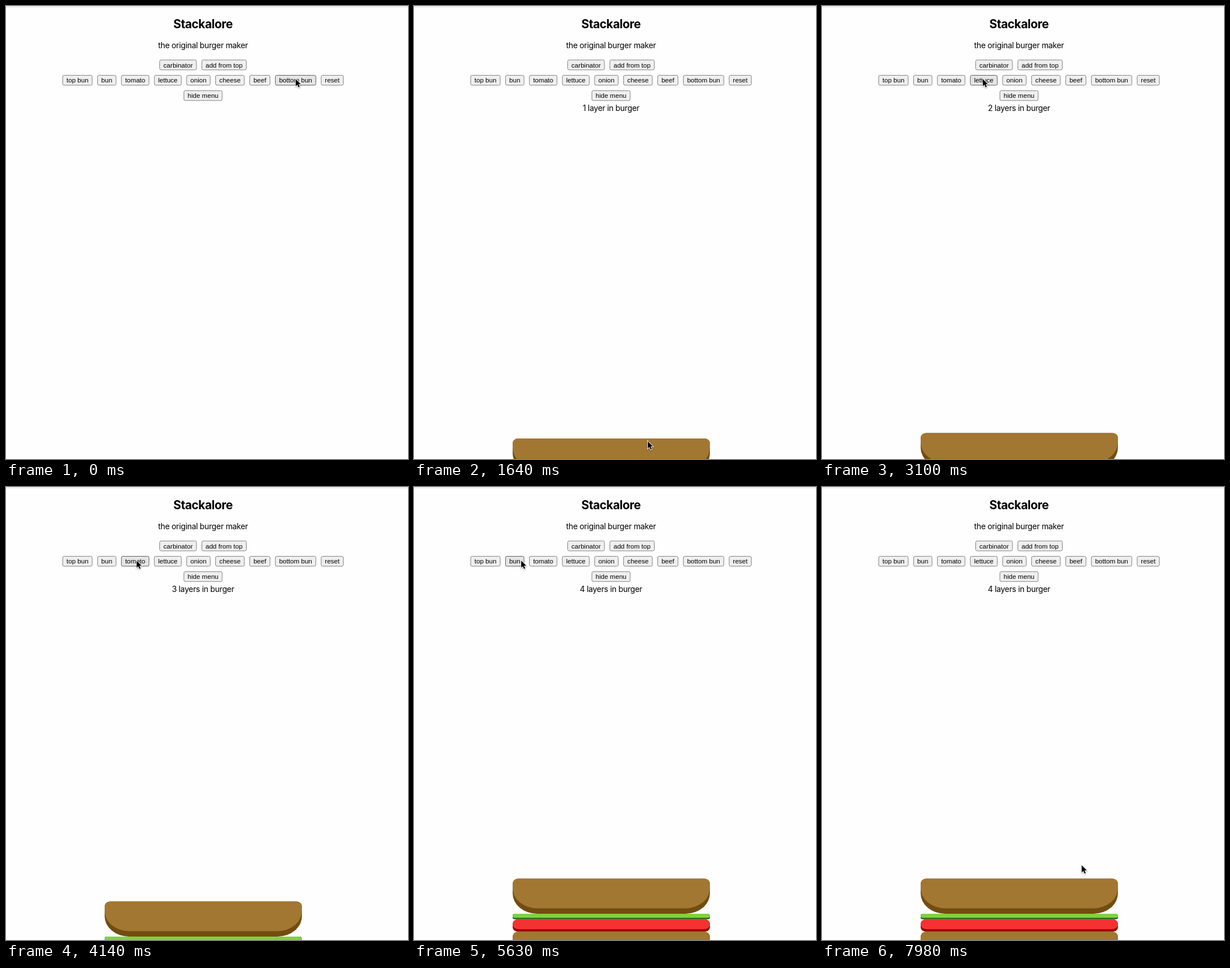
An HTML page for the animation above (8 s loop, 705 by 794 pixels).

```html
<!DOCTYPE html>
<html lang="en">
<head>
<meta charset="utf-8">
<title>Stackalore</title>
<style>
html, body { margin: 0; width: 100%; height: 100%; overflow: hidden; background: #fefefe; }
svg { display: block; }
text { text-anchor: middle; fill: #000; font: 13.9px Inter, sans-serif; letter-spacing: -.3px; }
.title { font-size: 20.8px; font-weight: 700; letter-spacing: -.45px; }
.btn text { font: 11.57px "Liberation Sans", Arial, sans-serif; letter-spacing: 0; }
.btn rect { fill: #efefef; stroke: #767676; stroke-width: .9; }
.btn.hover rect { fill: #e5e5e5; stroke: #4f4f4f; }
.btn.active rect { fill: #f5f5f5; stroke: #8d8d8d; }
#cursor { filter: drop-shadow(0 1px 1px rgba(0, 0, 0, .35)); }
</style>
</head>
<body>
<svg width="705" height="794" viewBox="0 0 705 794">
  <rect width="705" height="794" fill="#fefefe"/>
  <rect y="1" width="705" height="1" fill="#d2d2d2"/>
  <text class="title" x="345.5" y="39">Stackalore</text>
  <text x="345.5" y="73.5">the original burger maker</text>
  <g id="buttons"></g>
  <text id="count" x="345.5" y="183.5"></text>
  <g id="burger"></g>
  <path id="cursor" d="M0 0V12.6L2.9 9.9L4.9 14.6L7 13.7L5 9.1H9Z"
        fill="#000" stroke="#fff" stroke-width="1.8" paint-order="stroke"/>
</svg>
<script>
const LOOP = 8000;
const TICK = 147.7; // the screen refreshes once per tick
const CENTER = 345.5;
const $ = id => document.getElementById(id);

function add(parent, tag, attrs = {}, text = '') {
  const el = document.createElementNS('http://www.w3.org/2000/svg', tag);
  for (const k in attrs) el.setAttribute(k, attrs[k]);
  el.textContent = text;
  return parent.appendChild(el);
}

// Buttons are as wide as their label and each row is centred
const menu = [
  'carbinator,add from top',
  'top bun,bun,tomato,lettuce,onion,cheese,beef,bottom bun,reset',
  'hide menu'
];
const PAD = 7, GAP = 8.5, HEIGHT = 18.2;

function buildRow(labels, row) {
  const y = 94.2 + row * 26.85;
  const items = labels.split(',').map(label => {
    const el = add($('buttons'), 'g', { class: 'btn' });
    const box = add(el, 'rect', { y: y + .45, height: HEIGHT - .9, rx: 2.5 });
    const text = add(el, 'text', { y: y + 13.3 }, label);
    return { el, box, text, y, w: text.getComputedTextLength() + 2 * PAD };
  });
  let x = CENTER - (items.reduce((sum, b) => sum + b.w + GAP, -GAP)) / 2;
  for (const b of items) {
    b.x = x;
    b.box.setAttribute('x', x + .45);
    b.box.setAttribute('width', b.w - .9);
    b.text.setAttribute('x', x + b.w / 2);
    x += b.w + GAP;
  }
  return items;
}
const buttons = menu.flatMap(buildRow);

// Slab with round top corners and elliptical bottom corners
function slab(h, top, rx, ry) {
  const l = 173, r = 519;
  return `M${l} ${top}A${top} ${top} 0 0 1 ${l + top} 0H${r - top}A${top} ${top} 0 0 1 ${r} ${top}` +
    `V${h - ry}A${rx} ${ry} 0 0 1 ${r - rx} ${h}H${l + rx}A${rx} ${ry} 0 0 1 ${l} ${h - ry}Z`;
}

const layers = [
  { h: 61.5, lip: 9.5, top: 9, rx: 43, ry: 36, face: '#a27731', edge: '#724c10' },
  { h: 9.6, lip: 2.6, top: 4, rx: 4, ry: 3, face: '#80d13e', edge: '#27701a' },
  { h: 21.8, lip: 4.6, top: 9, rx: 10, ry: 8, face: '#f43232', edge: '#980c0c' },
  { h: 40, lip: 7, top: 9, rx: 9, ry: 9, face: '#a27731', edge: '#724c10' }
];
for (const s of layers) {
  s.el = add($('burger'), 'g');
  add(s.el, 'path', { d: slab(s.h, s.top, s.rx, s.ry), fill: s.edge });
  add(s.el, 'path', { d: slab(s.h - s.lip, s.top, s.rx, s.ry), fill: s.face });
}

// Cursor stops: tick, x, y
const stops = [
  [8, 508, 128], [11, 410, 763], [13, 61, 470], [19, 282, 128],
  [23, 282, 128], [26, 229, 129], [34, 229, 129], [36, 188, 129],
  [39, 188, 129], [43, 405, 761], [45, 438, 771], [47, 407, 757],
  [50, 572, 330], [52, 450, 663], [53, 450, 663], [54, 455.5, 663]
];
// Ticks of mouse presses; the release, one tick later, adds a layer
const presses = [4, 20, 27, 37];

function cursorAt(tick) {
  const i = stops.findIndex(s => s[0] >= tick);
  if (i < 1) return stops.at(i).slice(1);
  const [a, b] = [stops[i - 1], stops[i]];
  const p = (tick - a[0]) / (b[0] - a[0]);
  const e = p * p * (3 - 2 * p);
  return [a[1] + (b[1] - a[1]) * e, a[2] + (b[2] - a[2]) * e];
}

function render(t) {
  const tick = Math.max(0, Math.floor((t - 9) / TICK + .08));
  const [x, y] = cursorAt(tick);
  const pressed = presses.includes(tick);
  const n = presses.filter(p => tick > p).length;

  $('cursor').setAttribute('transform', `translate(${x} ${y})`);
  for (const b of buttons) {
    const over = x >= b.x && x <= b.x + b.w && y >= b.y && y <= b.y + HEIGHT;
    b.el.setAttribute('class', 'btn' + (over ? (pressed ? ' active' : ' hover') : ''));
  }
  $('count').textContent = n ? `${n} layer${n > 1 ? 's' : ''} in burger` : '';

  // Every added layer lifts the stack by its own height
  let top = 758 - layers.slice(1, n).reduce((sum, s) => sum + s.h, 0);
  layers.forEach((s, i) => {
    s.el.style.display = i < n ? '' : 'none';
    s.el.setAttribute('transform', `translate(0 ${top})`);
    top += s.h;
  });
}

const start = performance.now();
function loop() {
  render((performance.now() - start) % LOOP);
  requestAnimationFrame(loop);
}
loop();
</script>
</body>
</html>
```
